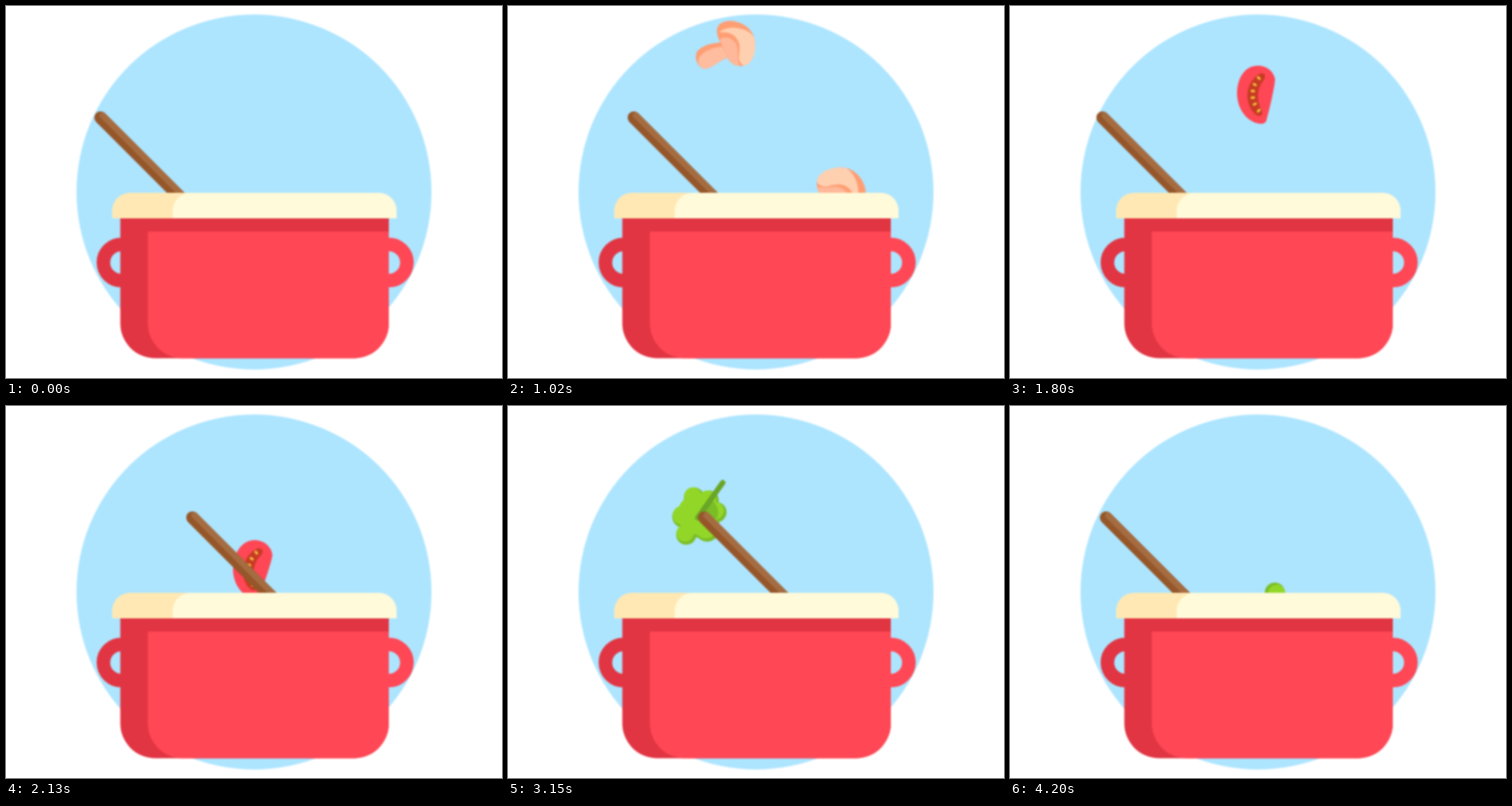
Write an HTML page with a canvas that moves like this. It is 640 px wide and 480 px high and loops after 4.23 s.

```html
<!DOCTYPE html>
<html lang="en">
<head>
<meta charset="utf-8">
<title>Cooking pot</title>
<style>
html, body { margin: 0; width: 100%; height: 100%; overflow: hidden; background: #fff; }
canvas { display: block; filter: blur(0.9px); }
</style>
</head>
<body>
<canvas id="stage" width="640" height="480"></canvas>
<script>
const ctx = document.getElementById('stage').getContext('2d');
const LOOP = 4230, STEP = 30, TAU = Math.PI * 2;
const RED = '#ff4755', DARK_RED = '#e13543';

function fill(color, path) {
  ctx.fillStyle = color;
  ctx.fill(new Path2D(path));
}

function disc(color, x, y, r) {
  ctx.fillStyle = color;
  ctx.beginPath();
  ctx.arc(x, y, r, 0, TAU);
  ctx.fill();
}

function line(color, width, x1, y1, x2, y2) {
  ctx.strokeStyle = color;
  ctx.lineWidth = width;
  ctx.lineCap = 'round';
  ctx.beginPath();
  ctx.moveTo(x1, y1);
  ctx.lineTo(x2, y2);
  ctx.stroke();
}

// Ingredients are drawn around their own centre.
function mushroom() {
  fill('#ff9e73', 'M-2 -8C-20 -14 -38 -14 -47 -8C-56 0 -55 16 -46 22C-34 27 -20 17 -2 17Z');
  fill('#ffbd9f', 'M-2 -1C-18 -6 -34 -5 -43 0C-54 6 -54 18 -45 22C-34 27 -20 17 -2 17Z');
  fill('#ff9e73', 'M-8 -24C-5 -43 12 -41 25 -35C40 -27 48 -12 47 0C46 17 34 36 20 38C8 38 -4 30 -5 12C-6 0 -9 -12 -8 -24Z');
  fill('#ffd0b0', 'M-4 -26C18 -33 42 -17 47 -1C46 18 34 38 20 38C8 38 14 12 17 -2C18 -14 8 -22 -4 -26Z');
  fill('#ff9e73', 'M-7 -23C6 -27 20 -16 21 -1C21 12 12 20 10 36C0 33 -5 22 -5 10Z');
  fill('#ffb899', 'M-7 -14C2 -19 14 -11 16 1C18 12 10 20 10 36C0 33 -5 22 -5 10Z');
}

function tomato() {
  fill(RED, 'M3 -36C14 -36 23 -29 25 -19C25 -10 17 24 14 34C13 39 8 40 1 38C-15 33 -24 16 -24 0C-24 -20 -14 -36 3 -36Z');
  fill('#c73b23', 'M6 -26C12 -27 14 -22 10 -17C1 -6 1 10 8 22C10 28 5 31 0 27C-15 15 -15 -15 6 -26Z');
  for (let i = 0; i < 6; i++) {
    const u = i / 5 * 2 - 1;
    ctx.save();
    ctx.translate(-4 + 8 * u * u, 1 + 21 * u);
    ctx.rotate(u * -0.8);
    ctx.fillStyle = '#f4bd42';
    ctx.beginPath();
    ctx.ellipse(0, 0, 3, 1.7, 0, 0, TAU);
    ctx.fill();
    ctx.restore();
  }
}

const LOBES = [[-7, -24, 13], [12, -20, 13], [22, -5, 13], [10, 17, 16], [-17, 24, 13], [-21, 1, 14], [-1, 0, 28]];
function leaf() {
  for (const [x, y, r] of LOBES) disc('#7bbd27', x, y, r);
  for (const [x, y, r] of LOBES) disc('#92d728', x - 1.5, y - 2, r - 2);
  fill('#7bbd27', 'M-6 4L14 -22C22 -16 28 -6 22 3C12 8 2 7 -6 4Z');
  line('#69a526', 7, -2, 2, 30, -43);
}

// Each one passes (x, y) at time t, falling at v px/ms.
const FOOD = [
  { draw: mushroom, t: 450, x: 250, y: 112, v: 0.4, rot: 0, size: 1 },
  { draw: mushroom, t: 1020, x: 427, y: 248, v: 0.57, rot: 1.78, size: 0.85, flip: -1 },
  { draw: mushroom, t: 1020, x: 282, y: 52.5, v: 0.4, rot: -0.32, size: 0.8 },
  { draw: tomato, t: 1800, x: 317, y: 113, v: 0.29, rot: 0, size: 1 },
  { draw: tomato, t: 2490, x: 424.5, y: 85, v: 0.42, rot: -0.21, size: 1.08 },
  { draw: leaf, t: 3150, x: 247, y: 142, v: 0.4, rot: 0, size: 1 },
  { draw: leaf, t: 4200, x: 339, y: 270, v: 0.324, rot: 2.62, size: 1 }
];

function drawFood(item, t) {
  const dt = t - item.t, y = item.y + item.v * dt;
  if (y < -100 || y > 340) return;
  ctx.save();
  ctx.translate(item.x, y);
  ctx.rotate(item.rot + dt * 0.0003);
  ctx.scale(item.size * (item.flip || 1), item.size);
  item.draw();
  ctx.restore();
}

// Turning points of the stirring: time, x of the handle's tip.
const STIR = [[0, 122], [430, 259], [846, 114], [1290, 259], [1760, 117], [2240, 258],
  [2682, 122], [3100, 258], [3480, 145], [3850, 250], [LOOP, 122]];

function stirX(t) {
  const i = STIR.findIndex(p => p[0] > t);
  const [t0, x0] = STIR[i - 1], [t1, x1] = STIR[i];
  return x0 + (x1 - x0) * (1 - Math.cos(Math.PI * (t - t0) / (t1 - t0))) / 2;
}

function spoon(x) {
  line('#955629', 16, x, 144, x + 115, 259);
  line('#a56c41', 8, x + 2.8, 141.2, x + 117.8, 256.2);
}

function handle(color, x, side) {
  ctx.strokeStyle = color;
  ctx.lineWidth = 17.5;
  ctx.lineCap = 'butt';
  ctx.beginPath();
  ctx.arc(x, 331, 23.3, -Math.PI / 2, Math.PI / 2, side < 0);
  ctx.stroke();
}

function pot() {
  handle(DARK_RED, 149, -1);
  handle(RED, 494, 1);
  fill(DARK_RED, 'M147.5 265H494V409A45 45 0 0 1 449 454.5H192.5A45 45 0 0 1 147.5 409Z');
  fill(RED, 'M183 291H494V409A45 45 0 0 1 449 454.5H228A45 45 0 0 1 183 409Z');
  fill('#ffe8b3', 'M137 274V264A23 23 0 0 1 160 241H240V274Z');
  fill('#fffad9', 'M215 274V264A23 23 0 0 1 238 241H481A23 23 0 0 1 504 264V274Z');
}

function render(t) {
  ctx.fillStyle = '#fff';
  ctx.fillRect(0, 0, 640, 480);
  disc('#ade5ff', 320, 240, 229);
  for (const item of FOOD) drawFood(item, t);
  spoon(stirX(t));
  pot();
}

const start = performance.now();
function tick() {
  const t = (performance.now() - start) % LOOP;
  render(Math.floor(t / STEP) * STEP);
  requestAnimationFrame(tick);
}
tick();
</script>
</body>
</html>
```
